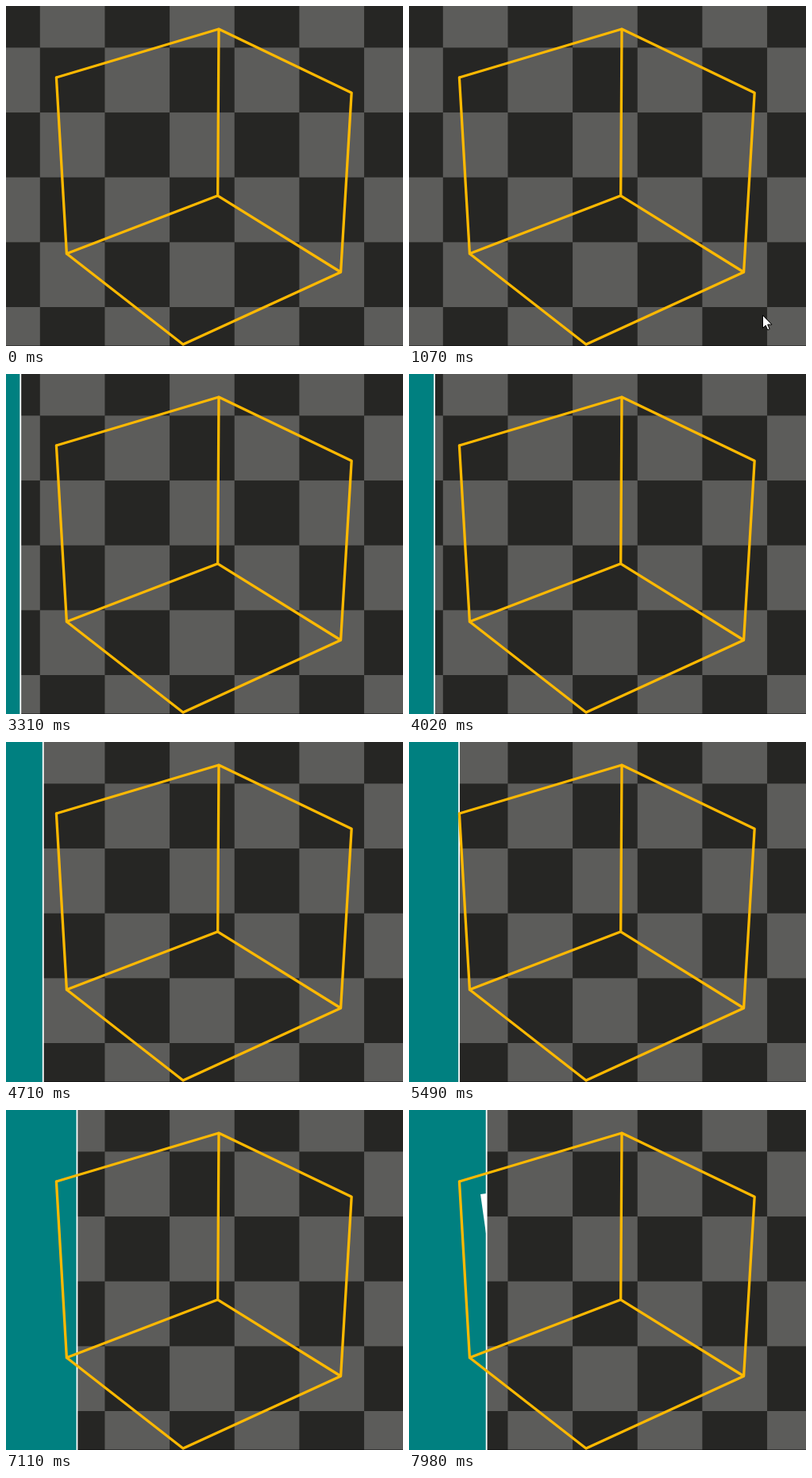
An HTML page with a canvas for the animation above (8 s loop, 500x428 px).

```html
<!DOCTYPE html>
<html lang="en">
<head>
<meta charset="utf-8">
<title>Cube wipe</title>
<style>
html, body { margin: 0; width: 100%; height: 100%; overflow: hidden; background: #262624; }
canvas { display: block; }
</style>
</head>
<body>
<canvas width="500" height="428"></canvas>
<script>
const W = 500, H = 428, LOOP = 8000, CELL = 81.65;
const WIPE = 2140, STEP = 837;
const g = document.querySelector('canvas').getContext('2d');

// wipe position at the start of every STEP
const EDGE = [.6, 12.1, 27.6, 45.5, 63, 75, 90.4, 97.8];

const CUBE = new Path2D('M63.4 90L268 29L435.2 109.2L421.6 335L223 426L76.4 311.8ZL76.4 311.8L266.7 238.8L421.6 335M268 29L266.7 238.8');
const GLYPH = new Path2D('M90 106L112 103V262Z');
const ARROW = new Path2D('M.5 .5V16.5L4.2 13L6.7 18.8L9.2 17.7L6.7 12H11.7Z');

const mix = (a, b, k) => a + (b - a) * k;
const progress = (t, start, end) => Math.min(1, Math.max(0, (t - start) / (end - start)));

function edgeAt(t) {
  const k = (t - WIPE) / STEP, i = Math.min(Math.floor(k), EDGE.length - 2);
  return mix(EDGE[i], EDGE[i + 1], k - i);
}

function checker() {
  g.fillStyle = '#262624';
  g.fillRect(0, 0, W, H);
  g.fillStyle = '#5c5c5a';
  for (let r = 0; r < 6; r++) {
    for (let c = 1 - r % 2; c < 7; c += 2) {
      g.fillRect(42.8 + (c - 1) * CELL, 52.4 + (r - 1) * CELL, CELL, CELL);
    }
  }
  g.fillStyle = 'rgba(0,0,0,.4)';
  g.fillRect(0, H - 1, W, 1);
}

function panel(x) {
  g.save();
  g.beginPath();
  g.rect(0, 0, x, H);
  g.clip();
  g.fillStyle = '#008080';
  g.fillRect(0, 0, W, H);
  g.fillStyle = '#fff';
  g.fill(GLYPH);
  g.restore();
  g.fillStyle = '#fff';
  g.fillRect(x - .9, 0, 1.8, H);
}

function ring(r, color) {
  g.beginPath();
  g.arc(444.5, 388.5, r, 0, 7);
  g.strokeStyle = color;
  g.stroke();
}

function cursor(t) {
  const enter = progress(t, 440, 590), leave = progress(t, 2110, 2260);
  g.lineWidth = 1;
  if (t >= 820 && t < 1070) {
    ring(12, '#000');
    ring(11, '#fff');
  }
  g.save();
  g.translate(445 + 10 * leave, 389 + 40 * (1 - enter + leave));
  g.fillStyle = '#fff';
  g.strokeStyle = '#000';
  g.fill(ARROW);
  g.stroke(ARROW);
  g.restore();
}

function draw(now) {
  const t = now % LOOP;
  checker();
  if (t >= WIPE) panel(edgeAt(t));
  g.lineWidth = 3.3;
  g.lineJoin = g.lineCap = 'round';
  g.strokeStyle = '#ffb900';
  g.stroke(CUBE);
  if (t >= 470 && t < 2260) cursor(t);
  requestAnimationFrame(draw);
}
requestAnimationFrame(draw);
</script>
</body>
</html>
```
